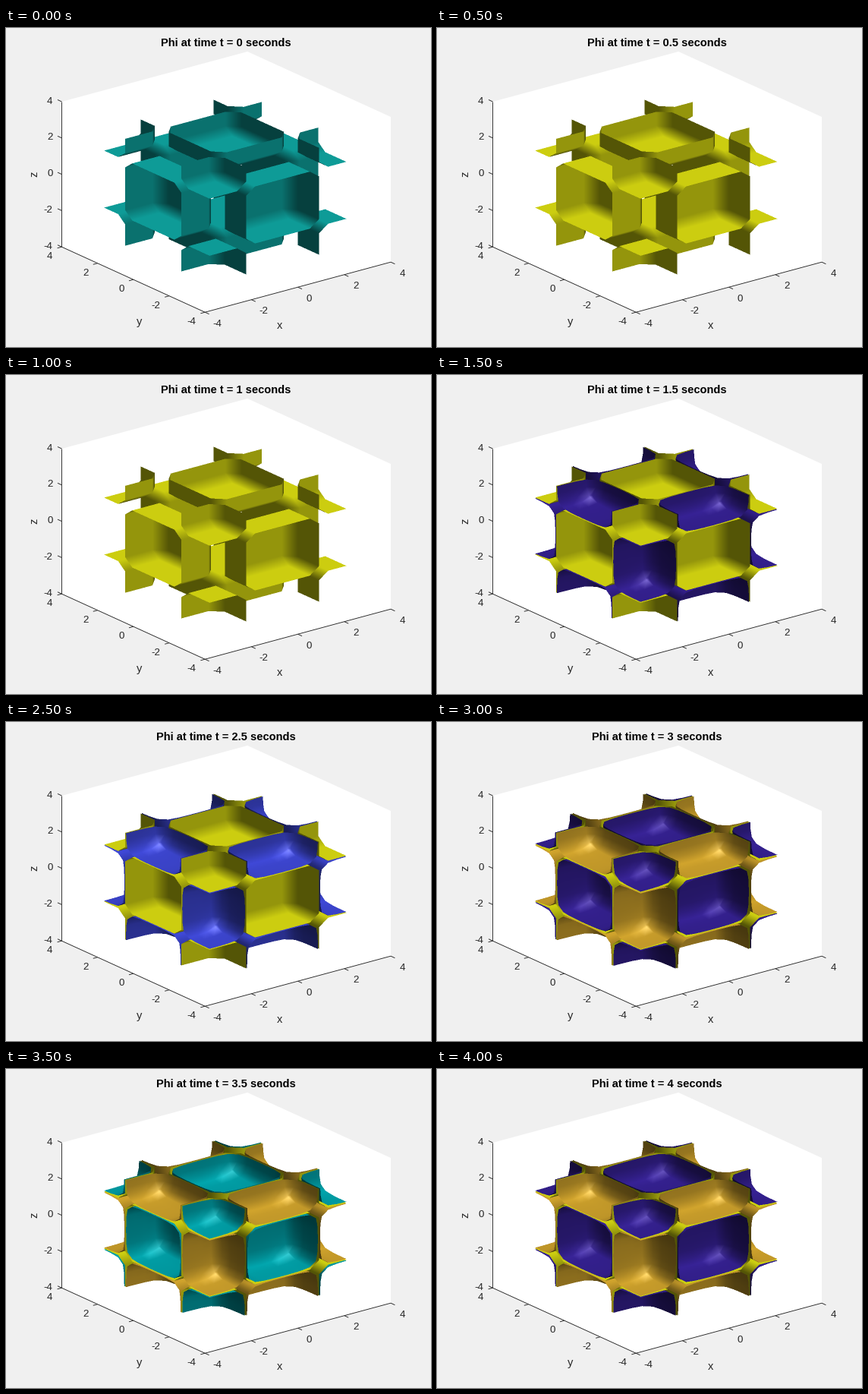
Recreate the animation shown at these times as a matplotlib script. Size 560x420 px, loop 4500 ms.

```python
import numpy as np
import matplotlib.pyplot as plt
from matplotlib.animation import FuncAnimation

W, H, SS = 560, 420, 2
plt.rcParams["font.family"] = "Liberation Sans"

# Screen projection: pixel offset per data unit along x, y, z
CENTER = np.array([290.2, 202.6])
PROJ = np.array([[30.6, -8.25], [-23.6, -10.75], [0, -23.9]])
AZ, EL = np.radians(-37.5), np.radians(30)


def direction(az, el):
    return np.array([np.sin(az) * np.cos(el), -np.cos(az) * np.cos(el), np.sin(el)])


VIEW = direction(AZ, EL)
LIGHT = direction(AZ + np.radians(30), EL + np.radians(30))

TEAL = (0.07, 0.7455, 0.7257)
CYAN = (0.007, 0.731, 0.766)
YELLOW = (0.9769, 0.9839, 0.0805)
INDIGO = (0.2422, 0.1504, 0.6603)
BLUE = (0.281, 0.323, 0.958)
ORANGE = (0.93, 0.73, 0.2)
INK = (0.15, 0.15, 0.15)


def project(p):
    return CENTER + np.asarray(p, float) @ PROJ


# ---- isosurface -------------------------------------------------------
def face_ring(a, s):
    b, c = (a + 1) % 3, (a + 2) % 3
    ring = [s << a | p << b | q << c for p, q in ((0, 0), (1, 0), (1, 1), (0, 1))]
    return ring if s else ring[::-1]


RINGS = [face_ring(a, s) for a in range(3) for s in (0, 1)]
OFFSETS = np.array([[c >> a & 1 for a in range(3)] for c in range(8)])


def edge(a, b):
    return min(a, b), max(a, b)


def cell_loops(case):
    """Closed loops of cut cube edges for one inside/outside pattern."""
    link = {}
    for ring in RINGS:
        on = [case >> c & 1 for c in ring]
        for i in range(4):
            if not on[i] and on[(i + 1) % 4]:
                j = i + 1
                while on[(j + 1) % 4]:
                    j += 1
                start = edge(ring[i], ring[(i + 1) % 4])
                link[start] = edge(ring[j % 4], ring[(j + 1) % 4])
    loops = []
    while link:
        e, loop = next(iter(link)), []
        while e in link:
            loop.append(e)
            e = link.pop(e)
        loops.append(loop)
    return loops


N = 16
AXIS = -np.pi + 2 * np.pi / N * np.arange(N)
GRID = np.stack(np.meshgrid(AXIS, AXIS, AXIS, indexing="ij"), axis=-1)
PHI = np.cos(GRID).prod(axis=-1)
GRAD = np.stack(np.gradient(PHI), axis=-1)


def isosurface(field, level):
    """Triangles as arrays (n, 3, 3) of points and of normals."""
    pts, nrm, cache = [], [], {}
    inside = field > level
    for ijk in np.ndindex(N - 1, N - 1, N - 1):
        i, j, k = ijk
        block = inside[i:i + 2, j:j + 2, k:k + 2]
        if block.all() or not block.any():
            continue
        nodes = [tuple(o) for o in OFFSETS + ijk]
        case = sum(int(inside[n]) << c for c, n in enumerate(nodes))
        if case not in cache:
            cache[case] = cell_loops(case)
        for loop in cache[case]:
            p, g = [], []
            for a, b in loop:
                a, b = nodes[a], nodes[b]
                t = (level - field[a]) / (field[b] - field[a])
                p.append(GRID[a] + t * (GRID[b] - GRID[a]))
                n = GRAD[a] + t * (GRAD[b] - GRAD[a])
                g.append(n / (np.linalg.norm(n) + 1e-12))
            for m in range(1, len(p) - 1):
                pts.append((p[0], p[m], p[m + 1]))
                nrm.append((g[0], g[m], g[m + 1]))
    return np.array(pts), np.array(nrm)


# ---- shading and depth buffer -----------------------------------------
def light(normals):
    nl = np.maximum(normals @ LIGHT, 0)
    mirror = 2 * nl[..., None] * normals - LIGHT
    shine = np.where(nl > 0, np.maximum(mirror @ VIEW, 0), 0)
    return 0.3 + 0.6 * nl, 0.9 * shine ** 10


def rasterize(pts, nrm):
    """Layers: depth, diffuse factor, highlight."""
    buf = np.zeros((3, H * SS, W * SS))
    buf[0] = -np.inf
    flat = np.cross(pts[:, 1] - pts[:, 0], pts[:, 2] - pts[:, 0])
    flat *= np.where(flat @ VIEW < 0, -1, 1)[:, None]
    turn = np.einsum("tvk,tk->tv", nrm, flat) < 0
    nrm = np.where(turn[..., None], -nrm, nrm)
    diffuse, shine = light(nrm)
    attrs = np.stack([pts @ VIEW, diffuse, shine], axis=-1)
    screen = project(pts) * SS
    for (a, b, c), att in zip(screen, attrs):
        u, v = b - a, c - a
        area = u[0] * v[1] - u[1] * v[0]
        if abs(area) < 1e-6:
            continue
        low = np.floor(np.minimum(np.minimum(a, b), c)).astype(int)
        high = np.ceil(np.maximum(np.maximum(a, b), c)).astype(int) + 1
        dx = np.arange(low[0], high[0])[None, :] + 0.5 - a[0]
        dy = np.arange(low[1], high[1])[:, None] + 0.5 - a[1]
        s = (dx * v[1] - dy * v[0]) / area
        t = (dy * u[0] - dx * u[1]) / area
        hit = (s >= -1e-6) & (t >= -1e-6) & (s + t <= 1 + 1e-6)
        if not hit.any():
            continue
        val = (att[0][:, None, None] + (att[1] - att[0])[:, None, None] * s
               + (att[2] - att[0])[:, None, None] * t)
        part = buf[:, low[1]:high[1], low[0]:high[0]]
        hit &= val[0] > part[0]
        part[:, hit] = val[:, hit]
    return buf


def compose(layers):
    """Merge (buffer, colour) pairs by depth into a smoothed RGBA image."""
    depth = np.full((H * SS, W * SS), -np.inf)
    rgb = np.zeros((H * SS, W * SS, 3))
    for buf, color in layers:
        near = buf[0] > depth
        depth[near] = buf[0][near]
        rgb[near] = buf[1][near][:, None] * np.array(color) + buf[2][near][:, None]
    alpha = np.isfinite(depth)[..., None].astype(float)
    rgba = np.concatenate([np.clip(rgb, 0, 1) * alpha, alpha], axis=-1)
    rgba = rgba.reshape(H, SS, W, SS, 4).mean(axis=(1, 3))
    rgba[..., :3] /= np.maximum(rgba[..., 3:], 1e-9)
    return np.clip(rgba, 0, 1)


shell = rasterize(*isosurface(-PHI, 1e-6))
plus = rasterize(*isosurface(PHI, 0.045))
minus = rasterize(*isosurface(-PHI, 0.05))

base = (shell, YELLOW)
warm = [base, (plus, ORANGE)]
start = compose([(shell, TEAL)])
plain = compose([base])
dark = compose([base, (plus, INDIGO)])
bright = compose([base, (plus, BLUE)])
warm_dark = compose(warm + [(minus, INDIGO)])
warm_cyan = compose(warm + [(minus, CYAN)])
IMAGES = [start, plain, plain, dark, dark, bright, warm_dark, warm_cyan, warm_dark]

# ---- stage ------------------------------------------------------------
fig = plt.figure(figsize=(W / 100, H / 100), dpi=100, facecolor="#f0f0f0")
ax = fig.add_axes([0, 0, 1, 1])
ax.axis("off")


def px(size):
    return size * 72 / 100


def line(a, b):
    ax.plot([a[0], b[0]], [a[1], b[1]], color=INK, lw=px(0.9), zorder=3,
            solid_capstyle="butt")


def label(x, y, s, size=13.33, ha="center", **kw):
    return ax.text(x, y, s, fontsize=px(size), ha=ha, color=kw.pop("color", INK),
                   va=kw.pop("va", "baseline"), zorder=4, **kw)


hull = [(-4, 4, 4), (4, 4, 4), (4, -4, 4), (4, -4, -4), (-4, -4, -4), (-4, 4, -4)]
ax.fill(*project(hull).T, color="white", lw=0, zorder=1)
picture = ax.imshow(IMAGES[0], extent=(0, W, H, 0), interpolation="nearest",
                    aspect="auto", zorder=2)
ax.set_xlim(0, W)
ax.set_ylim(H, 0)

corner = {k: project(p) for k, p in
          dict(top=(-4, 4, 4), left=(-4, 4, -4), front=(-4, -4, -4), right=(4, -4, -4)).items()}
line(corner["top"], corner["left"])
line(corner["left"], corner["front"])
line(corner["front"], corner["right"])

TICK_X = np.array([5.4, 2.5])
TICK_Y = np.array([-5.8, 1.6])
TICK_Z = np.array([-5.4, -2.5])
for v in (-4, -2, 0, 2, 4):
    shift = 1.5 if v < 0 else 0
    for p, tick in (((v, -4, -4), TICK_X), ((-4, v, -4), TICK_Y), ((-4, 4, v), TICK_Z)):
        a = project(p)
        line(a, a + tick)
    x, y = project((v, -4, -4))
    label(x + 15 + shift / 2, y + 18.5, f"{v}")
    x, y = project((-4, v, -4))
    label(x - 12, y + 16, f"{v}", ha="right")
    x, y = project((-4, 4, v))
    label(x - 12, y + 2.5, f"{v}", ha="right")

label(361, 396, "x", 14.67)
label(176, 391, "y", 14.67)
label(37, 192, "z", 14.67, rotation=90, va="center")
title = label(290, 24, "", 14.67, color="black", weight="bold")


def draw(i):
    picture.set_data(IMAGES[i])
    title.set_text(f"Phi at time t = {i / 2:g} seconds")
    return picture, title


anim = FuncAnimation(fig, draw, frames=9, interval=500, repeat=True, repeat_delay=0)
plt.show()
```
